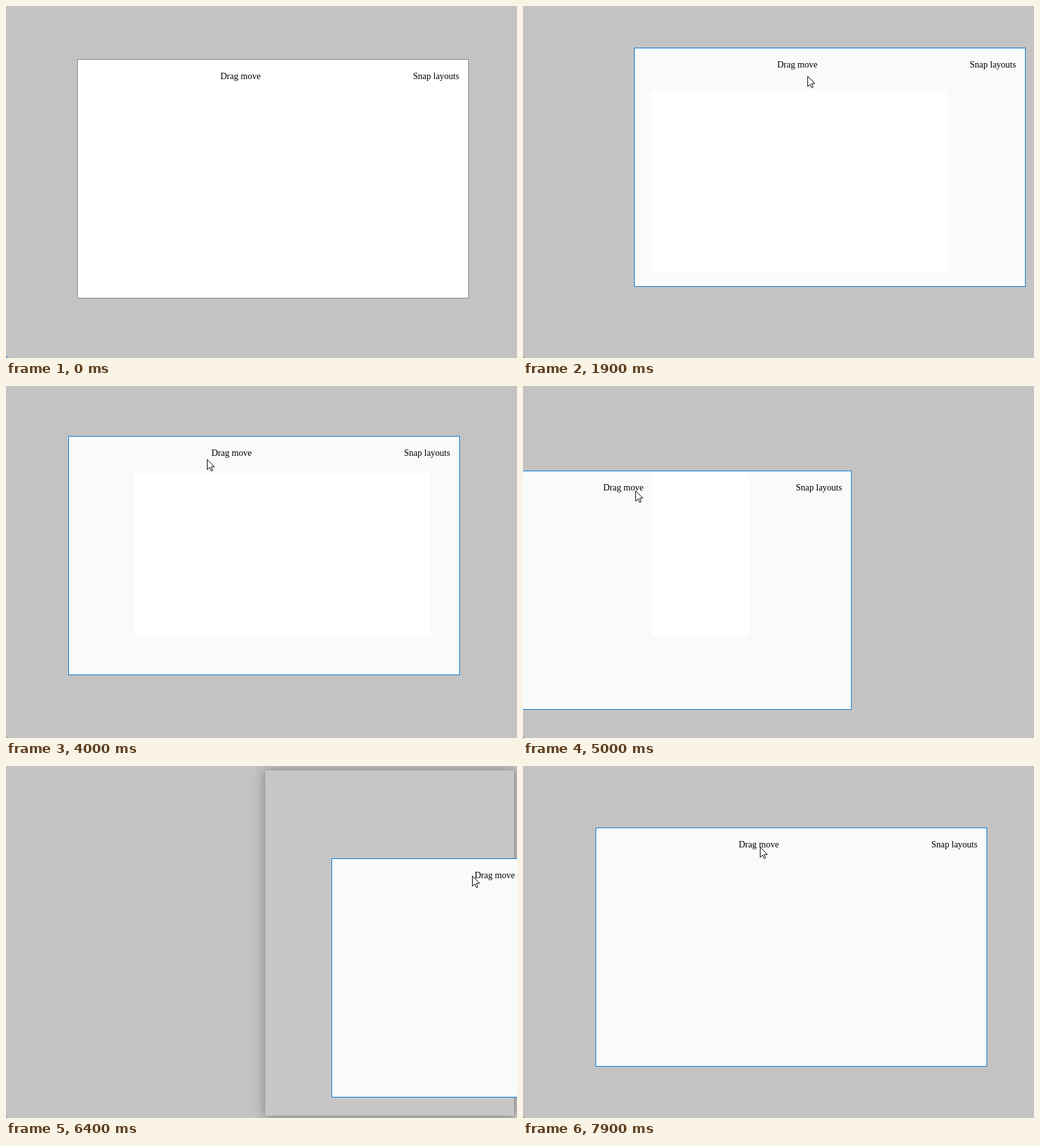
An HTML page with a canvas that plays this animation: 796 px wide and 549 px high, repeating every 8000 ms.

```html
<!DOCTYPE html>
<html lang="en">
<head>
<meta charset="utf-8">
<title>Window drag</title>
<style>
html, body { margin: 0; width: 100%; height: 100%; overflow: hidden; background: #c3c3c3; }
canvas { display: block; }
</style>
</head>
<body>
<canvas width="796" height="549"></canvas>
<script>
const ctx = document.querySelector('canvas').getContext('2d');
const STEP = 100, LOOP = 8000, W = 610, H = 373;
const FOCUS = 6, DRAG = 12, ORBIT = 14, ORBIT_END = 28;   // in steps

const out = u => 1 - (1 - u) ** 3;
const smooth = u => u * u * (3 - 2 * u);

// Keys are [step, x, y, easing into this key]
const dragKeys = [
  [DRAG, 111, 83], [13, 199, 131], [ORBIT_END, 111, 17], [30, 104, 77], [39, 102, 76], [40, 97, 78],
  [45, -257, 128], [47, -257, 128], [57.5, 543, 149, smooth], [63, 543, 149],
  [64, 507, 144, smooth], [70, 114, 116], [79, 113, 96, smooth]
];
const approachKeys = [
  [1, 758, 101], [4, 629, 216], [5, 629, 216], [6, 584, 201], [7, 584, 201], [10, 367, 113]
];

function along(keys, step) {
  const i = keys.findIndex(key => key[0] >= step);
  if (i <= 0) return keys.at(i).slice(1, 3);
  const [t0, x0, y0] = keys[i - 1], [t1, x1, y1, ease = out] = keys[i];
  const f = ease((step - t0) / (t1 - t0));
  return [x0 + (x1 - x0) * f, y0 + (y1 - y0) * f];
}

// The window is swung round in a tilted ellipse, 100 degrees per step
function orbit(step) {
  const rad = Math.PI / 180, angle = (step - 19) * 100 - 38;
  return [119.7 + 67.6 * Math.cos(angle * rad), 88 + 49 * Math.sin((angle + 10) * rad)];
}

const windowAt = step =>
  step >= ORBIT && step < ORBIT_END ? orbit(step) : along(dragKeys, step);

// While dragging, the pointer runs ahead of the window by its velocity
function pointerAt(step) {
  if (step <= DRAG) return along(approachKeys, step);
  const dt = 0.01, lead = 0.19;
  const [x, y] = windowAt(step), [nextX, nextY] = windowAt(step + dt);
  return [x + 256 + lead * (nextX - x) / dt, y + 30 + lead * (nextY - y) / dt];
}

// Opacity: rises for two steps before `shown`, falls for two after `hidden`
const fade = (step, shown, hidden) =>
  Math.max(0, Math.min(1, (step - shown) / 2 + 1, (hidden - step) / 2 + 1));

function drawCorner(focused) {
  ctx.fillStyle = focused ? '#777' : '#0078d7';
  const r = focused ? 4 : 5;
  ctx.beginPath();
  ctx.moveTo(0, 549 - r);
  ctx.quadraticCurveTo(0, 549, r, 549);
  ctx.lineTo(0, 549);
  ctx.fill();
}

function drawPreview(x, alpha) {
  if (!alpha) return;
  ctx.save();
  ctx.globalAlpha = alpha;
  ctx.shadowColor = 'rgba(0,0,0,.34)';
  ctx.shadowBlur = 18;
  ctx.shadowOffsetY = 1;
  ctx.fillStyle = '#c6c6c6';
  ctx.beginPath();
  ctx.roundRect(x, 6, 389, 540, 3);
  ctx.fill();
  ctx.shadowColor = 'transparent';
  ctx.strokeStyle = '#9f9f9f';
  ctx.beginPath();
  ctx.roundRect(x + .5, 6.5, 388, 539, 3);
  ctx.stroke();
  ctx.strokeStyle = '#cecece';
  ctx.strokeRect(x + 1.5, 7.5, 386, 537);
  ctx.restore();
}

// The white area shared by every window position so far
function drawSharedArea(step) {
  let left = -1e4, top = -1e4, right = 1e4, bottom = 1e4;
  for (let s = 0; s <= step; s++) {
    const [x, y] = windowAt(s).map(Math.round);
    left = Math.max(left, x + 1);
    top = Math.max(top, y + 1);
    right = Math.min(right, x + W - 1);
    bottom = Math.min(bottom, y + H - 1);
  }
  if (right <= left || bottom <= top) return;
  ctx.fillStyle = '#fff';
  ctx.fillRect(left, top, right - left, bottom - top);
}

function drawWindow(step, focused) {
  const [x, y] = windowAt(step).map(Math.round);
  ctx.fillStyle = '#f9fafc';
  ctx.fillRect(x, y, W, H);
  drawSharedArea(step);
  ctx.strokeStyle = focused ? '#0078d7' : '#888';
  ctx.strokeRect(x + .5, y + .5, W - 1, H - 1);
  ctx.fillStyle = '#000';
  ctx.font = '14px "Liberation Serif", "Times New Roman", serif';
  ctx.fillText('Drag move', x + 223, y + 31);
  ctx.fillText('Snap layouts', x + 523, y + 31);
}

const arrow = new Path2D('M.5 .5V16.5L4.2 13L6.8 18.5L9 17.5L6.6 12H11.7Z');

function drawPointer([x, y]) {
  ctx.save();
  ctx.translate(Math.round(x), Math.round(y));
  ctx.fillStyle = '#fff';
  ctx.strokeStyle = '#000';
  ctx.fill(arrow);
  ctx.stroke(arrow);
  ctx.restore();
}

function draw(now) {
  const step = Math.floor(now % LOOP / STEP), focused = step >= FOCUS;
  ctx.lineWidth = 1;
  ctx.fillStyle = '#c3c3c3';
  ctx.fillRect(0, 0, 796, 549);
  drawCorner(focused);
  drawPreview(4, fade(step, 44, 47));
  drawPreview(403, fade(step, 58, 64));
  drawWindow(step, focused);
  if (step > 0) drawPointer(pointerAt(step));
}

let start;
function tick(now) {
  start ??= now;
  draw(now - start);
  requestAnimationFrame(tick);
}
draw(0);
requestAnimationFrame(tick);
</script>
</body>
</html>
```
